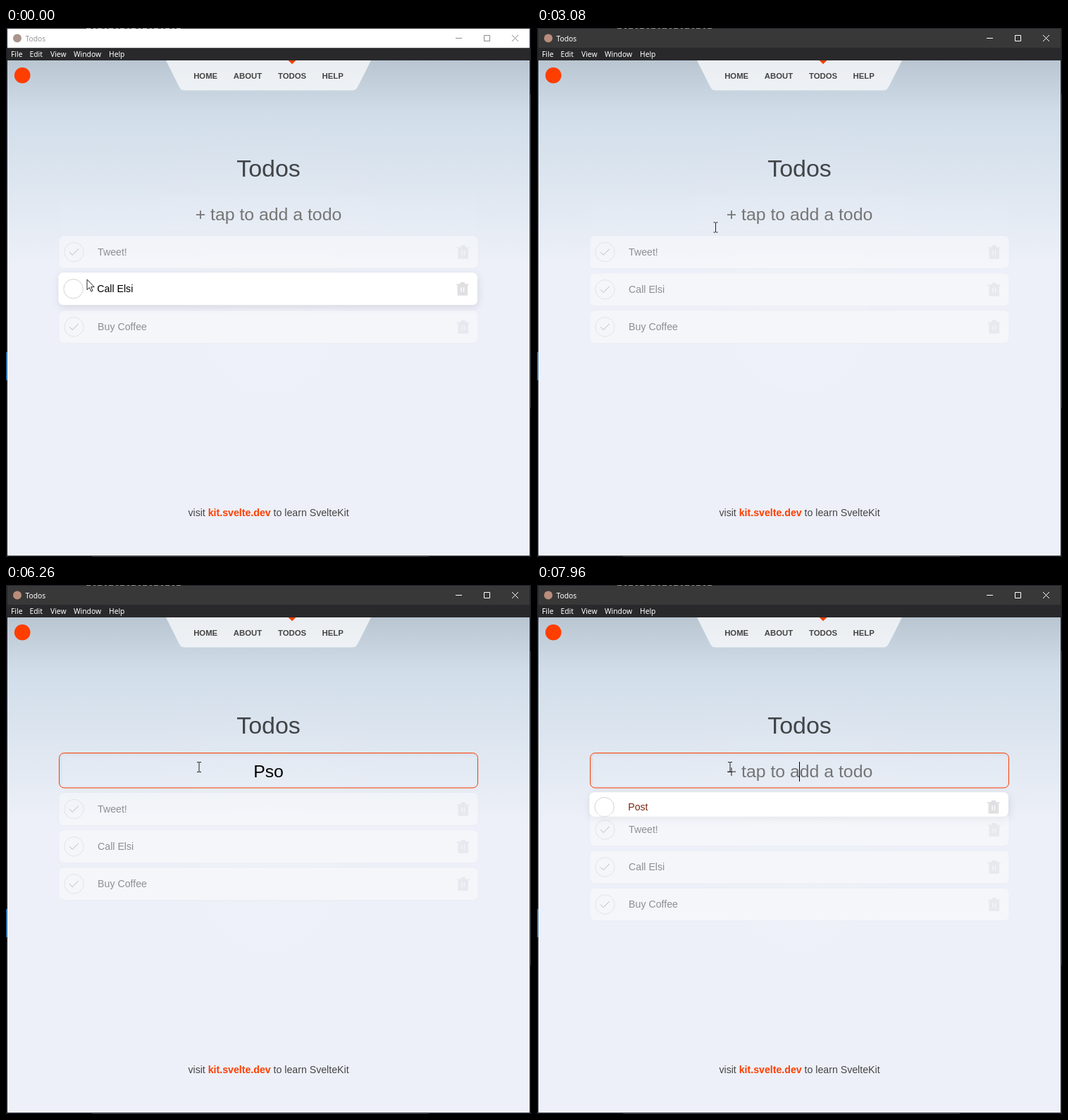
An HTML page for the animation above (8000 ms loop, 745 by 751 pixels).

```html
<!DOCTYPE html>
<html lang="en">
<head>
<meta charset="utf-8">
<title>Todos</title>
<style>
html, body { margin: 0; width: 100%; height: 100%; overflow: hidden; background: #1f2228; }
svg { display: block; }
#stage { width: 100vw; height: 100vh; font: 14.17px Arial, "Liberation Sans", sans-serif; }
.ui { font: 10.3px "Segoe UI", "Open Sans", sans-serif; }
.nav { font-size: 11.34px; font-weight: 700; fill: #444; text-anchor: middle; }
.field { font-size: 24.8px; text-anchor: middle; }
.open { filter: drop-shadow(1.8px 3.5px 5.3px rgba(0, 0, 0, .1)); }
.done { opacity: .4; filter: drop-shadow(0 0 .9px rgba(0, 0, 0, .1)); }
.open .tick { display: none; }
</style>
</head>
<body>
<svg id="stage" viewBox="0 0 745 751">
  <defs>
    <linearGradient id="sky" x1="0" y1="0" x2="0" y2="1">
      <stop offset="0" stop-color="#b9c6d2"/>
      <stop offset=".1045" stop-color="#d0dde9"/>
      <stop offset=".4135" stop-color="#edf0f8"/>
    </linearGradient>
    <radialGradient id="glow">
      <stop offset="0" stop-color="#fff"/>
      <stop offset="1" stop-color="#fff" stop-opacity="0"/>
    </radialGradient>
    <filter id="blur" x="-5%" y="-50%" width="110%" height="200%"><feGaussianBlur stdDeviation="2.6"/></filter>
    <clipPath id="inside"><rect x="75.5" y="238.5" width="594" height="49.5" rx="7"/></clipPath>
    <g id="bin" stroke="#676778" stroke-width="1.5" stroke-linejoin="round" stroke-linecap="round" opacity=".2">
      <path d="M4.5 5V22H19.5V5Z M2 5H22 M8 5L9.64 2H14.39L16 5Z" fill="#676778"/>
      <path d="M10 10V16.5M14 10V16.5" stroke="#fff"/>
    </g>
  </defs>

  <!-- desktop and window -->
  <rect width="745" height="751" fill="#1f2228"/>
  <path d="M114 .5H252" stroke="#8b8e93" stroke-dasharray="6 4 3 3"/>
  <path d="M0 460H2V500H0Z" fill="#2b72ab"/>
  <path d="M122 750.5H600M744.5 94V540" stroke="#4a4d54"/>
  <rect id="bar" x="2" y="1" width="741" height="27.5"/>
  <circle id="icon" cx="16" cy="14.5" r="6"/>
  <text id="title" class="ui" x="27.5" y="18.5">Todos</text>
  <path id="buttons" d="M638 14.5H647 M678.5 10.5H686.5V18.5H678.5Z M718 10L727 19M727 10L718 19" fill="none"/>
  <rect x="2" y="28.5" width="741" height="17.5" fill="#29292b"/>
  <g class="ui" fill="#fff">
    <text x="7" y="41">File</text><text x="33.5" y="41">Edit</text><text x="63" y="41">View</text>
    <text x="96" y="41">Window</text><text x="146" y="41">Help</text>
  </g>

  <!-- page -->
  <rect x="2" y="46" width="741" height="703" fill="url(#sky)"/>
  <ellipse cx="372.5" cy="397.5" rx="296" ry="351.5" fill="url(#glow)" opacity=".05"/>
  <circle cx="23.2" cy="67.3" r="11.3" fill="#ff3e00"/>
  <path d="M227 46l14.17 28.33c7.08 14.17 7.08 14.17 14.17 14.17H489.6c7.08 0 7.08 0 14.17-14.17L518 46Z" fill="#fff" fill-opacity=".7"/>
  <path d="M400.7 46h10.6l-5.3 5.3Z" fill="#ff3e00"/>
  <g class="nav">
    <text x="283.2" y="71.6">HOME</text><text x="343" y="71.6">ABOUT</text>
    <text x="406" y="71.6">TODOS</text><text x="463.6" y="71.6">HELP</text>
  </g>
  <text x="372.5" y="211" font-size="34" text-anchor="middle" fill="#000" fill-opacity=".7">Todos</text>
  <text x="372.5" y="693.3" text-anchor="middle" fill="#444">visit <tspan font-weight="700" fill="#ff3e00">kit.svelte.dev</tspan> to learn SvelteKit</text>

  <rect x="75.5" y="238.5" width="594" height="49.5" rx="7" fill="#fff" opacity=".05"/>
  <g id="focus">
    <g clip-path="url(#inside)">
      <path d="M60 220H690V310H60Z M76.4 239.4V288.9H670.4V239.4Z" fill-rule="evenodd" opacity=".1" filter="url(#blur)"/>
    </g>
    <rect x="75.5" y="238.5" width="594" height="49.5" rx="7" fill="none" stroke="#ff3e00"/>
  </g>
  <text id="hint" class="field" x="372.5" y="273.3" fill="#757575">+ tap to add a todo</text>
  <text id="typed" class="field" x="372.5" y="273.3"></text>
  <rect id="caret" y="251" width="1" height="28"/>
  <g id="rows"></g>

  <!-- pointer -->
  <circle id="click" r="11" fill="#fdfd80"/>
  <path id="arrow" d="M0 0V14.6L3.4 11.5 5.8 17 8 16 5.7 10.6H10.2Z" fill="#fff" stroke="#111" stroke-width=".9"/>
  <path id="beam" d="M-3 -7H-.8L0 -6.4 .8 -7H3M0 -6.4V6.4M-3 7H-.8L0 6.4 .8 7H3" fill="none" stroke="#222"/>
</svg>
<script>
const LOOP = 8000, TOP = 295.1, PITCH = 53.1, HEIGHT = 46;
const ACTIVE = 1710, DONE = 1880, FOCUS = 3347, CLEAR = 7880, ADD = 7960;
const $ = id => document.getElementById(id);

// start, end, number of steps, target x, target y
const moves = [
  [90, 150, 2, 111, 372], [440, 520, 2, 105.5, 372], [880, 1070, 3, 97, 370],
  [2060, 2440, 5, 211.5, 310], [2890, 3075, 3, 253.5, 283],
  [3165, 3256, 2, 288, 264], [3985, 4080, 2, 274, 258.5]
];
const keys = [
  [0, ""], [5160, "P"], [5450, "Ps"], [5710, "Pso"], [6340, "Ps"], [6440, "P"],
  [6610, "Po"], [6970, "Pos"], [7260, "Post"], [CLEAR, ""]
];
const caretOn = [[FOCUS, 3890], [4340, 4890], [5160, 6260], [6340, 7790], [CLEAR, LOOP]];
const clicks = [[ACTIVE, 1800], [FOCUS, 3439]];

const within = (t, spans) => spans.some(([a, b]) => t >= a && t < b);
const show = (el, on) => el.setAttribute("display", on ? "inline" : "none");
const place = (el, x, y) => el.setAttribute("transform", `translate(${x} ${y})`);

// Row origin is the top left of the box; mid is the centre line of its content.
function makeRow(label, height = HEIGHT, mid = HEIGHT / 2, color = "#000") {
  const g = document.createElementNS("http://www.w3.org/2000/svg", "g");
  g.innerHTML = `
    <rect width="594.5" height="${height}" rx="7" fill="#fff"/>
    <g transform="translate(0 ${mid})">
      <circle cx="21.2" r="13.7" fill="none" stroke="#000" stroke-opacity=".2" stroke-width=".9"/>
      <path class="tick" d="M27.3 -4.2L18.9 4.2 15.1 .4" fill="none" stroke="#676778" stroke-linecap="round"/>
      <text x="54.8" y="4.9" fill="${color}">${label}</text>
      <use href="#bin" transform="translate(562.8 -10.6) scale(.885)"/>
    </g>`;
  return $("rows").appendChild(g);
}

const fresh = makeRow("Post", 34.6, 21, "#7b2a12");
const rows = ["Tweet!", "Call Elsi", "Buy Coffee"].map(s => makeRow(s));

function placeRow(g, y, done) {
  const shift = done ? 0 : -.9;
  g.setAttribute("class", done ? "done" : "open");
  place(g, 75.3 + shift, y + shift);
}

function pointer(t) {
  let x = 115, y = 357;
  for (const [start, end, n, toX, toY] of moves) {
    if (t < start) break;
    const step = Math.min(n, 1 + Math.floor((t - start) / (end - start) * (n - 1)));
    const p = (1 - Math.cos(Math.PI * step / n)) / 2;
    x += (toX - x) * p;
    y += (toY - y) * p;
  }
  return [x, y];
}

function draw(t) {
  const active = t >= ACTIVE;
  $("bar").setAttribute("fill", active ? "#383838" : "#fff");
  $("title").setAttribute("fill", active ? "#fff" : "#999");
  $("buttons").setAttribute("stroke", active ? "#fff" : "#8c8c8c");
  $("icon").setAttribute("fill", active ? "#b98d7c" : "#a9958d");

  const text = keys.filter(k => k[0] <= t).pop()[1];
  $("typed").textContent = text;
  show($("hint"), !text);
  show($("focus"), t >= FOCUS);
  show($("caret"), within(t, caretOn));
  $("caret").setAttribute("x", 372 + (text ? $("typed").getComputedTextLength() / 2 : 0));

  const added = t >= ADD;
  show(fresh, added);
  placeRow(fresh, TOP, false);
  rows.forEach((g, i) => placeRow(g, TOP + i * PITCH + (added ? 29.2 : 0), i !== 1 || t >= DONE));

  const [x, y] = pointer(t), isText = x > 118;
  show($("arrow"), !isText);
  show($("beam"), isText);
  show($("click"), within(t, clicks));
  for (const id of ["arrow", "beam", "click"]) place($(id), x, y);
}

const begin = performance.now();
function tick(now) {
  draw(Math.max(0, now - begin) % LOOP);
  requestAnimationFrame(tick);
}
draw(0);
requestAnimationFrame(tick);
</script>
</body>
</html>
```
